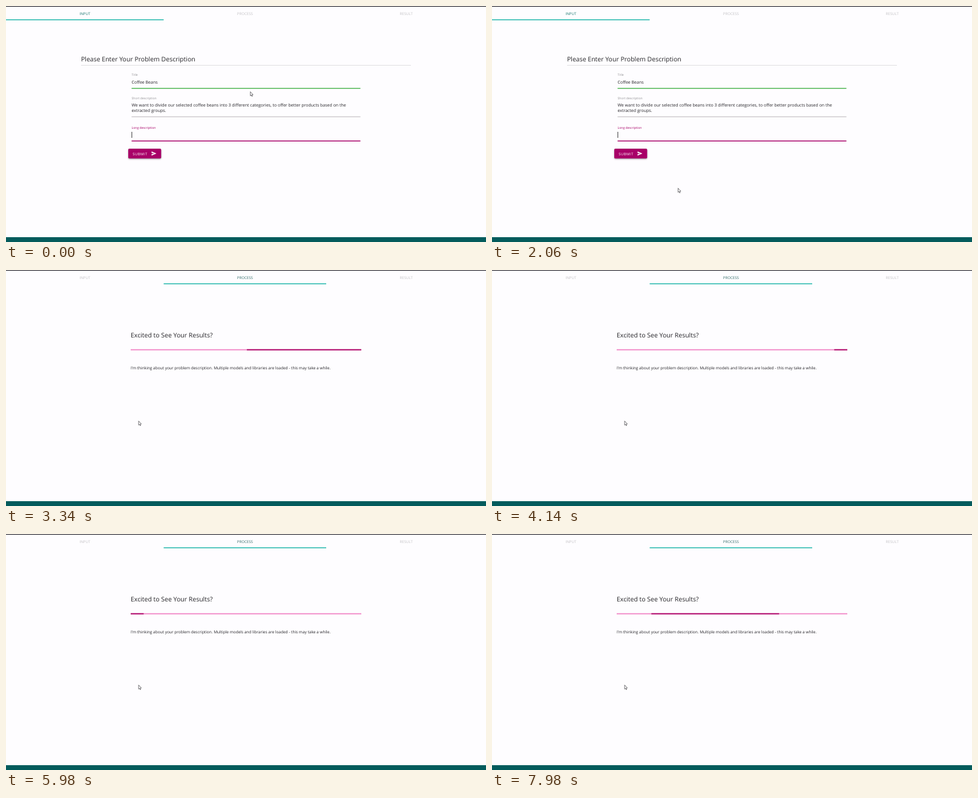
An HTML page with a canvas that plays this animation: 793 by 392 pixels, repeating every 8000 ms.

```html
<!DOCTYPE html>
<html lang="en">
<head>
<meta charset="utf-8">
<title>Problem description form</title>
<style>
html, body { margin: 0; width: 100%; height: 100%; overflow: hidden; background: #fefdff; }
canvas { display: block; width: 793px; height: 392px; }
</style>
</head>
<body>
<canvas id="stage" width="793" height="392"></canvas>
<script>
const ctx = document.getElementById('stage').getContext('2d');

const LOOP = 8000;
const STEP = 80;
const SUBMIT_AT = 2596;
const CYCLE = 1680;
const SHORT_DELAY = 920;
const CARET_BLINK = 437;

const INK = '#262529';
const MUTED = '#c4c3c6';
const LABEL = '#949296';
const MAGENTA = '#a80068';
const TEAL = '#1d7a72';

const clamp = v => Math.min(1, Math.max(0, v));
const mix = (a, b, k) => a + (b - a) * k;

function bezier(x1, y1, x2, y2) {
  const at = (a, b, s) => 3 * (1 - s) * (1 - s) * s * a + 3 * (1 - s) * s * s * b + s * s * s;
  return x => {
    if (x <= 0) return 0;
    if (x >= 1) return 1;
    let lo = 0, hi = 1;
    for (let i = 0; i < 24; i++) {
      const mid = (lo + hi) / 2;
      if (at(x1, x2, mid) < x) lo = mid; else hi = mid;
    }
    return at(y1, y2, lo);
  };
}
const standard = bezier(0.4, 0, 0.2, 1);
const longEase = bezier(0.65, 0.815, 0.735, 0.395);
const shortEase = bezier(0.165, 0.84, 0.44, 1);
const smooth = bezier(0.42, 0, 0.58, 1);

function rect(x, y, w, h, color) {
  ctx.fillStyle = color;
  ctx.fillRect(x, y, w, h);
}

function text(str, x, y, size, color, spacing = 0) {
  ctx.font = `${size}px "Open Sans", "Noto Sans", sans-serif`;
  ctx.letterSpacing = `${spacing}px`;
  ctx.textRendering = 'geometricPrecision';
  ctx.fillStyle = color;
  ctx.fillText(str, x, y);
}

function polygon(points, color) {
  ctx.beginPath();
  points.forEach(([x, y]) => ctx.lineTo(x, y));
  ctx.closePath();
  ctx.fillStyle = color;
  ctx.fill();
}

function drawFrame(t) {
  rect(0, 0, 793, 392, '#fefdff');
  rect(0, 0, 793, 1.2, '#2d2c33');
  rect(0, 384, 793, 8, '#035b5c');

  const k = standard(clamp((t - SUBMIT_AT) / 240));
  const processing = t >= SUBMIT_AT;
  text('INPUT', 121.5, 15, 6.1, processing ? MUTED : TEAL);
  text('PROCESS', 381.8, 15, 6.1, processing ? '#356f6c' : MUTED);
  text('RESULT', 650.5, 15, 6.1, MUTED);
  rect(mix(0, 260.5, k), 22, mix(260.5, 268.5, k), 1.7, '#3dbfb5');
}

function drawForm(t) {
  const x = 207.5, w = 378;
  text('Please Enter Your Problem Description', 124, 92, 10.5, INK);
  rect(124, 98, 545, 1, '#dfdee1');

  text('Title', x, 116, 5.15, LABEL);
  text('Coffee Beans', x, 129.4, 7, INK);
  rect(x, 136, w, 1.5, '#4fb653');

  text('Short description', x, 154.5, 5.15, LABEL);
  text('We want to divide our selected coffee beans into 3 different categories, to offer better products based on the', x, 166.7, 7, INK);
  text('extracted groups.', x, 176.3, 7, INK);
  rect(x, 183.6, w, 0.8, '#a5a0a5');

  text('Long description', x, 203.7, 5.15, MAGENTA);
  rect(x, 223.5, w, 1.5, MAGENTA);
  const blinks = Math.floor((t - 420) / CARET_BLINK);
  if (blinks % 2) rect(207.4, 209, 1, 10, '#333');

  ctx.save();
  ctx.shadowColor = 'rgba(0,0,0,0.4)';
  ctx.shadowBlur = 2.5;
  ctx.shadowOffsetY = 1;
  ctx.fillStyle = MAGENTA;
  ctx.beginPath();
  ctx.roundRect(202, 237, 54.3, 16.3, 1.8);
  ctx.fill();
  ctx.restore();
  text('SUBMIT', 209.3, 247.6, 6, '#fff', 0.4);
  polygon([[240.5, 241.6], [248.5, 245.1], [240.5, 248.6], [240.5, 245.9], [246, 245.1], [240.5, 244.3]], '#fff');
}

function progressSegment(from, to) {
  const x = 206, w = 381;
  const left = clamp(from), right = clamp(to);
  if (right > left) rect(x + left * w, 131.6, (right - left) * w, 1.8, '#a90063');
}

function drawProcess(t) {
  text('Excited to See Your Results?', 206, 112, 10.5, INK);
  rect(206, 131.6, 381, 1.8, '#f183c5');

  const sweep = CYCLE * 0.6;
  const elapsed = t - SUBMIT_AT;
  const a = longEase((elapsed % CYCLE) / sweep);
  progressSegment(-0.35 + 1.35 * a, 1.9 * a);
  if (elapsed >= SHORT_DELAY) {
    const b = shortEase(((elapsed - SHORT_DELAY) % CYCLE) / sweep);
    progressSegment(-2 + 3.07 * b, 1.08 * b);
  }

  text("I'm thinking about your problem description. Multiple models and libraries are loaded - this may take a while.", 206, 165, 6.52, INK);
}

function drawPointer(t) {
  const down = smooth(clamp((t - 680) / 880));
  const back = smooth(clamp((t - 2060) / 440));
  const x = mix(mix(403.3, 307, down), 218.7, back);
  const y = mix(mix(142.2, 302.4, down), 250.6, back);
  ctx.save();
  ctx.translate(x, y);
  polygon([[0.4, 0.2], [0.4, 7], [1.9, 5.7], [2.9, 8], [4, 7.5], [3, 5.3], [4.9, 5.1]], '#fff');
  ctx.strokeStyle = '#3a393d';
  ctx.lineWidth = 0.7;
  ctx.stroke();
  ctx.restore();
}

function snap(t) {
  const base = t < 1900 ? 840 : 1900;
  return t < 840 ? t : base + Math.floor((t - base) / STEP) * STEP;
}

function render() {
  const now = performance.now() % LOOP;
  const t = snap(now);
  drawFrame(t);
  if (t < SUBMIT_AT) drawForm(now < 1900 ? now : t);
  else drawProcess(t);
  drawPointer(t);
  requestAnimationFrame(render);
}
render();
</script>
</body>
</html>
```
